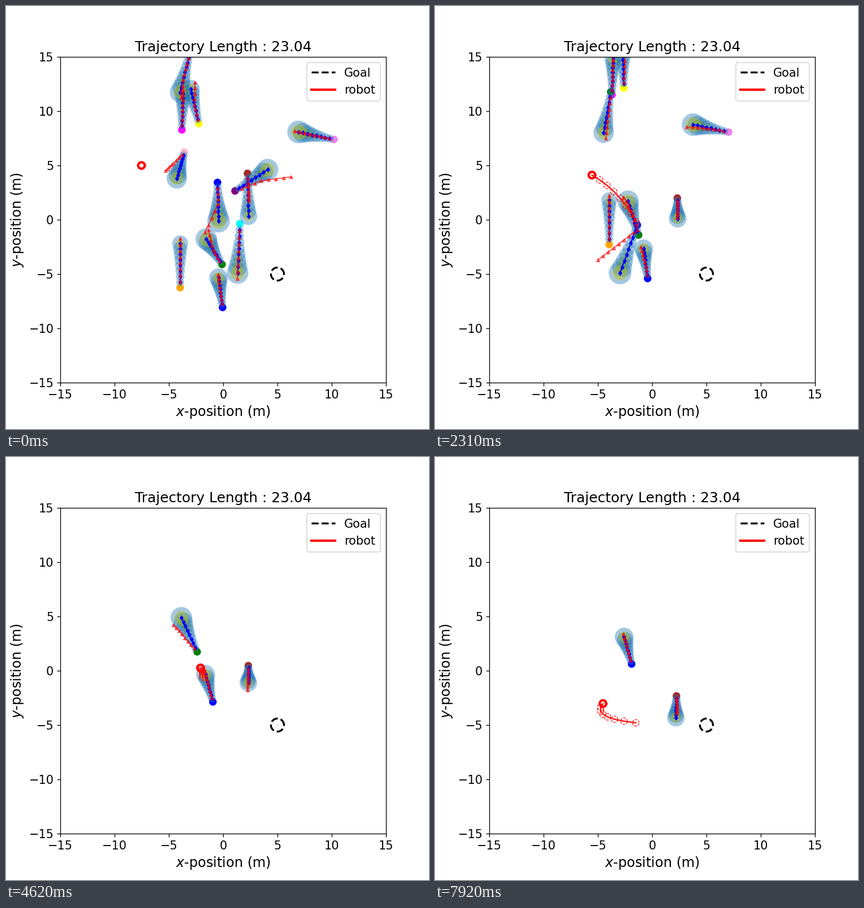
Animation of 748x748 px, one loop 8000 ms. Source, as a matplotlib script:

```python
import numpy as np
import matplotlib.pyplot as plt
from matplotlib.animation import FuncAnimation
from matplotlib.collections import EllipseCollection
from matplotlib.colors import to_rgba

SIZE, DPI = 748, 120
SCALE = 19.2            # pixels per metre
STEP, TICK, LOOP = 330, 50, 8000
HORIZON = 8             # steps looked ahead
MEMORY = 4              # past steps used for a walker's velocity
BODY = 0.35             # walker radius in metres
AHEAD = np.arange(1, HORIZON + 1)
NAN = np.full((1, 2), np.nan)
TURN = np.linspace(0, 2 * np.pi, 100)
UNIT = np.column_stack([np.cos(TURN), np.sin(TURN)])
HALO, CORE = to_rgba("tab:blue", 0.4), to_rgba("y", 0.4)


def metres(xy):
    """Stage pixels to plot coordinates."""
    return (np.asarray(xy, float) - (384, 378)) * (1 / SCALE, -1 / SCALE)


def track(keys, t):
    """Values of the key rows (step, a, b, ...) at the steps t."""
    keys = np.asarray(keys, float)
    return np.stack([np.interp(t, keys[:, 0], col) for col in keys.T[1:]], axis=-1)


def join(parts):
    """Stack polylines with gaps between them."""
    return np.vstack([row for part in parts for row in (part, NAN)])


class Walker:
    """Walks along key points (step, x, y) and disappears after its last step."""

    def __init__(self, color, last, radius, *keys):
        self.color, self.last = to_rgba(color), last
        self.spread = (radius / SCALE - BODY) * (AHEAD / HORIZON) ** 1.6
        keys = np.array(keys, float)
        pace = (keys[1] - keys[0]) / (keys[1, 0] - keys[0, 0])
        self.keys = np.vstack([keys[0] - MEMORY * pace, keys])

    def at(self, n):
        return metres(track(self.keys, n))

    def future(self, n):
        return self.at(n + AHEAD)

    def forecast(self, n):
        """Straight on at a little less than the recent velocity."""
        velocity = (self.at(n) - self.at(n - MEMORY)) / MEMORY
        return self.at(n) + 0.9 * AHEAD[:, None] * velocity


walkers = [
    Walker("magenta", 13, 15, (0, 311, 219), (22, 317, 24)),
    Walker("yellow", 13, 16, (0, 341, 208), (4, 333, 174), (21, 338, 10)),
    Walker("green", 9, 18, (0, 325, 82), (5, 313, 131), (17, 300, 255)),
    Walker("violet", 13, 20, (0, 580, 236), (10, 493, 217.5), (21, 388, 209)),
    Walker("pink", 2, 18, (-4, 323, 232), (0, 315.5, 258), (4, 296, 278), (10, 275, 297)),
    Walker("purple", 6, 19, (-4, 373, 348), (0, 405, 327), (4, 451, 309), (14, 583, 292)),
    Walker("brown", 24, 15.5, (-4, 426, 254), (0, 427, 296), (4, 428.5, 327),
           (14, 428.5, 369), (24, 427, 422.5), (32, 428, 453)),
    Walker("blue", 9, 20, (0, 374, 312), (4, 375, 350), (8, 352, 400), (17, 270, 463)),
    Walker("cyan", 2, 19, (0, 413.5, 385), (10, 408, 506)),
    Walker("green", 21, 19, (0, 382, 457), (4, 366.5, 432), (10, 353.5, 378),
           (14, 338, 344.5), (20, 305.5, 307), (29, 261, 262)),
    Walker("orange", 9, 14, (0, 308, 498), (17, 308, 313)),
    Walker("blue", 24, 16.5, (0, 383, 533), (10, 373, 460), (20, 355, 392.5), (32, 333, 313)),
]

# (step, x, y, and the offset from there to the end of the plan)
ROBOT = [(1, 239.5, 282, 0, 0), (4, 251, 284, 67, 61), (7, 277.5, 299, 78, 83),
         (10, 311, 329, 45, 57), (14, 344, 373, 4, 17), (20, 320, 426, -27, 34),
         (22, 303, 429, 10, 47), (24, 297, 436, 58, 34)]


def plan(n):
    """Curve that leaves along the robot's heading and bends to the plan's end."""
    now, before = track(ROBOT, n), track(ROBOT, n - 1)
    here, end = now[:2], now[2:]
    move = here - before[:2]
    bend = move * np.hypot(*end) / (2 * np.hypot(*move) + 1e-9)
    u = np.linspace(0, 1, HORIZON)[:, None]
    return metres(here + 2 * u * (1 - u) * bend + u ** 2 * end)


plt.rcParams.update({"font.size": 12.5, "axes.titlesize": 14.9, "axes.labelsize": 14.4})
fig = plt.figure(figsize=(SIZE / DPI, SIZE / DPI), dpi=DPI)
ax = fig.add_axes([96 / SIZE, 82 / SIZE, 576 / SIZE, 576 / SIZE])
ax.set(xlim=(-15, 15), ylim=(-15, 15), xticks=range(-15, 16, 5), yticks=range(-15, 16, 5),
       title="Trajectory Length : 23.04", xlabel="$x$-position (m)",
       ylabel="$y$-position (m)")

ax.plot(*(0.6 * UNIT + (5, -5)).T, "k--", lw=2, label="Goal")
ax.plot([5], [-5], "k,", alpha=0.6)
forecast_line, = ax.plot([], [], "-d", color="blue", lw=1.2, ms=3.8, mew=0.6)
future_line, = ax.plot([], [], "-^", color="red", lw=1.3, ms=3.7, mew=0.6, alpha=0.6)
plan_rings, = ax.plot([], [], "--", color="red", lw=0.7)
plan_line, = ax.plot([], [], color="red", lw=1.3)
ring, = ax.plot([], [], color="red", lw=2.5, label="robot")
ax.legend(loc="upper right")
live = []


def discs(n, crowd):
    """Bodies, forecast halos and their cores as one collection."""
    items = [(w.at(n), BODY, w.color) for w in crowd]
    for w in crowd:
        for spot, spread in zip(w.forecast(n), w.spread):
            items += [(spot, spread + BODY, HALO), (spot, spread, CORE)]
    spots, radii, colors = zip(*items)
    width = 2 * np.array(radii)
    return EllipseCollection(width, width, np.zeros(len(width)), units="xy",
                             offsets=np.array(spots), offset_transform=ax.transData,
                             facecolors=colors, edgecolors="none", zorder=1)


def draw(i):
    n = (i * TICK + 40) // STEP
    crowd = [w for w in walkers if n <= w.last]
    while live:
        live.pop().remove()
    live.append(ax.add_collection(discs(n, crowd), autolim=False))
    forecast_line.set_data(*join([w.forecast(n) for w in crowd]).T)
    future_line.set_data(*join([w.future(n) for w in crowd]).T)
    route = plan(n)
    plan_line.set_data(*route.T)
    plan_rings.set_data(*join([0.3 * UNIT + p for p in route[1:]]).T)
    ring.set_data(*(0.3 * UNIT + route[0]).T)
    return live + [forecast_line, future_line, plan_rings, plan_line, ring]


anim = FuncAnimation(fig, draw, frames=LOOP // TICK, interval=TICK,
                     init_func=lambda: draw(0), repeat=True, repeat_delay=0)
plt.show()
```
